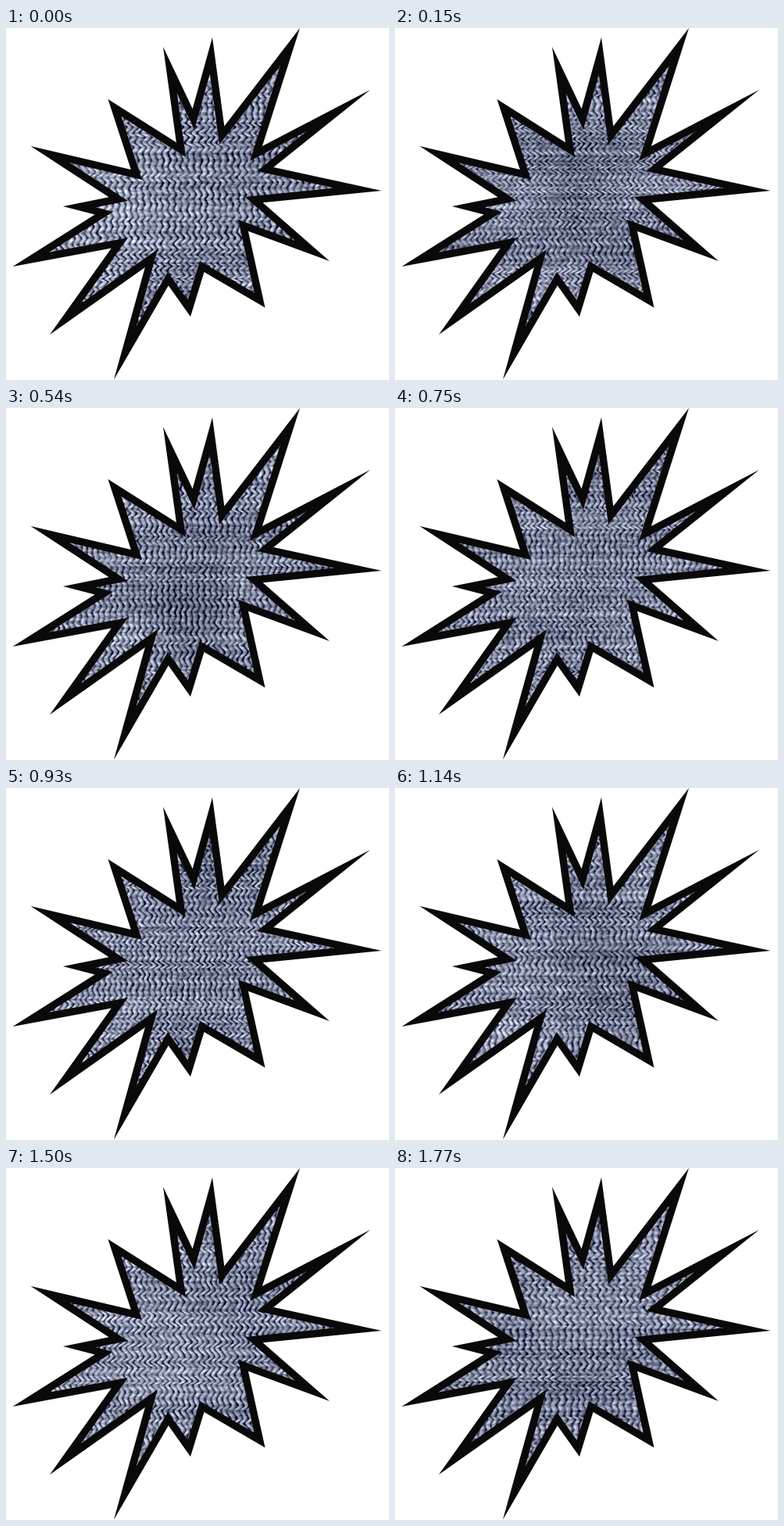
Write an HTML page with a canvas that moves like this. It is 490 px wide and 450 px high and loops after 1.8 s.

```html
<!DOCTYPE html>
<html lang="en">
<head>
<meta charset="utf-8">
<title>Static burst</title>
<style>
  html, body { margin: 0; width: 100%; height: 100%; overflow: hidden; background: #fff; }
  canvas { display: block; width: 490px; height: 450px; }
</style>
</head>
<body>
<canvas id="stage" width="490" height="450"></canvas>
<script>
const STEP = 30, STEPS = 60;
const BORDER = 9.4;
const AREA = { x: 46, y: 40, w: 390, h: 350 };

// Clockwise: outer tips of the border, and the inner valley that follows each tip.
const tips = [[201, 24], [264, 12], [376, 0], [466, 79], [480.5, 208], [414, 298], [331.5, 357.5],
  [236, 369], [138, 449.5], [56, 392], [8.5, 305], [73, 228], [31.5, 151], [130.5, 91]];
const valleys = [[241, 130], [273, 149], [312, 170], [321, 183], [306, 216], [297, 245], [248, 298],
  [207, 312], [194, 283], [156, 268], [137, 235], [156, 221], [174, 194], [230, 165]];

// Angle of the border edge between a tip and a valley lying BORDER inside it.
function edgeAngle(tip, valley, side) {
  const dx = valley[0] - tip[0], dy = valley[1] - tip[1];
  return Math.atan2(dy, dx) + side * Math.asin(BORDER / Math.hypot(dx, dy));
}

function crossing(p, a, q, b) {
  const t = ((q[0] - p[0]) * Math.sin(b) - (q[1] - p[1]) * Math.cos(b)) / Math.sin(b - a);
  return [p[0] + t * Math.cos(a), p[1] + t * Math.sin(a)];
}

function burst() {
  const n = tips.length, outer = [], inner = [];
  for (let i = 0; i < n; i++) {
    const next = (i + 1) % n, before = valleys[(i + n - 1) % n];
    const incoming = edgeAngle(tips[i], before, 1);
    const outgoing = edgeAngle(tips[i], valleys[i], -1);
    const returning = edgeAngle(tips[next], valleys[i], 1);
    outer.push(tips[i], crossing(tips[i], outgoing, tips[next], returning));
    inner.push(crossing(before, incoming, valleys[i], outgoing), valleys[i]);
  }
  return [outer, inner].map(points => new Path2D('M' + points.join('L') + 'Z'));
}

function seeded(seed) {
  let s = seed >>> 0;
  return () => {
    s = (s + 0x6D2B79F5) >>> 0;
    let n = Math.imul(s ^ (s >>> 15), s | 1);
    n ^= n + Math.imul(n ^ (n >>> 7), n | 61);
    return ((n ^ (n >>> 14)) >>> 0) / 4294967296;
  };
}

// Smooth random field between -1 and 1.
function field(rand, cellW, cellH) {
  const cols = Math.ceil(AREA.w / cellW) + 2;
  const rows = Math.ceil(AREA.h / cellH) + 2;
  const grid = Float32Array.from({ length: cols * rows }, () => rand() * 2 - 1);
  return (x, y) => {
    const gx = x / cellW, gy = y / cellH;
    const i = gx | 0, j = gy | 0, u = gx - i, v = gy - j, k = j * cols + i;
    const top = grid[k] + (grid[k + 1] - grid[k]) * u;
    const low = grid[k + cols] + (grid[k + cols + 1] - grid[k + cols]) * u;
    return top + (low - top) * v;
  };
}

// Zigzag shift for every scan line, with a shade that dips where it turns.
function scanLines(rand, rowHeight, sway) {
  const lines = [];
  let side = 1, from = 0;
  while (lines.length < AREA.h) {
    const height = Math.round(rowHeight * (0.65 + rand() * 0.7));
    const to = side * sway * (0.3 + rand());
    const shade = (rand() - 0.5) * 34;
    for (let i = 0; i < height; i++) {
      const u = i / height;
      const ease = u * u * (3 - 2 * u);
      lines.push({ shift: from + (to - from) * ease, shade: shade - 20 * Math.cos(u * 2 * Math.PI) });
    }
    from = to;
    side = -side;
  }
  return lines;
}

const ctx = document.getElementById('stage').getContext('2d');
const noise = document.createElement('canvas');
noise.width = AREA.w;
noise.height = AREA.h;
const noiseCtx = noise.getContext('2d');
const image = noiseCtx.createImageData(AREA.w, AREA.h);
const [outer, inner] = burst();

function paintNoise(step) {
  const rand = seeded(step * 7919 + 17);
  const k = 2 * Math.PI / (7.2 + rand() * 1.4);
  const lines = scanLines(rand, 6 + rand() * 2.5, 2.2 + rand() * 1.4);
  const phase = rand() * 20;
  const contrast = 46 + rand() * 14;
  const depth = rand() * 26;
  const bend = field(rand, 14, 9), strength = field(rand, 9, 6);
  const grain = field(rand, 3, 2), patch = field(rand, 90, 60);
  const data = image.data;
  let p = 0;
  for (let y = 0; y < AREA.h; y++) {
    const { shift, shade } = lines[y];
    for (let x = 0; x < AREA.w; x++) {
      const a = (x + shift + 1.7 * bend(x, y)) * k + phase;
      const wave = Math.sin(a) + 0.3 * Math.sin(2 * a + 0.8);
      const tint = Math.cos(a) * 7;
      const centre = Math.exp(-(((x - 205) / 70) ** 2));
      const light = wave * contrast * (1 + 0.6 * strength(x, y)) + shade
        + 36 * grain(x, y) + 18 * patch(x, y) - depth * centre;
      data[p++] = 124 + light - tint;
      data[p++] = 130 + light;
      data[p++] = 154 + light * 0.95 + tint;
      data[p++] = 255;
    }
  }
  noiseCtx.putImageData(image, 0, 0);
}

function draw(step) {
  paintNoise(step);
  ctx.fillStyle = '#fff';
  ctx.fillRect(0, 0, 490, 450);
  ctx.fillStyle = '#090909';
  ctx.fill(outer);
  const texture = ctx.createPattern(noise, 'repeat');
  texture.setTransform(new DOMMatrix().translate(AREA.x, AREA.y));
  ctx.fillStyle = texture;
  ctx.fill(inner);
}

const start = performance.now();
let shown = -1;
function tick() {
  const step = Math.floor((performance.now() - start) / STEP) % STEPS;
  if (step !== shown) draw(shown = step);
  requestAnimationFrame(tick);
}
tick();
</script>
</body>
</html>
```
